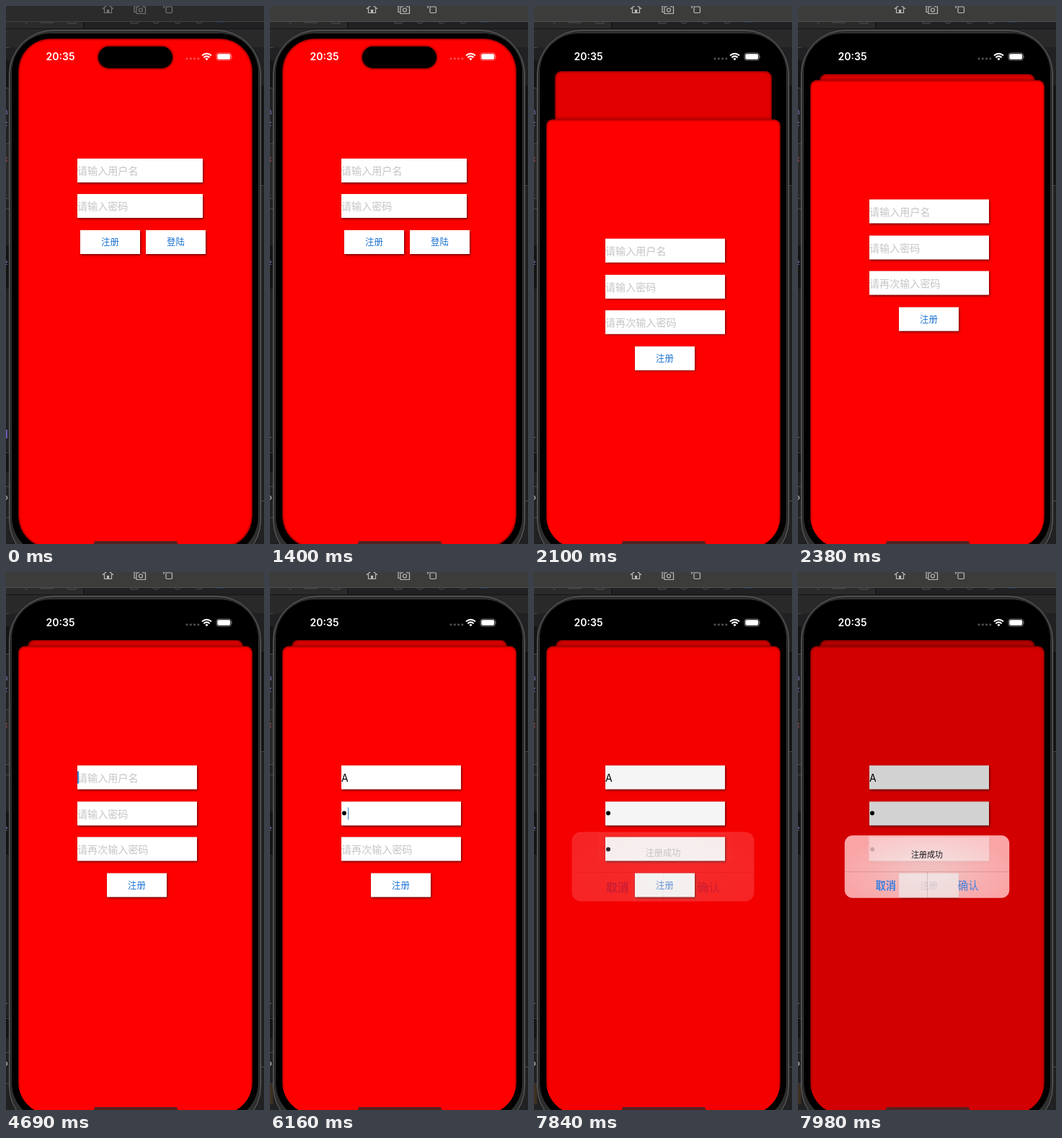
Write an HTML page that moves like this. It is 358 px wide and 744 px high and loops after 8 s.

```html
<!DOCTYPE html>
<html lang="zh-CN">
<head>
<meta charset="utf-8">
<title>注册</title>
<style>
  html, body { margin: 0; width: 100%; height: 100%; overflow: hidden; background: #212123; }
  body { font-family: "Noto Sans CJK SC", "Noto Sans CJK", "Noto Sans", sans-serif; }
  div, svg { position: absolute; box-sizing: border-box; }
  #stage { left: 0; top: 0; width: 358px; height: 744px; overflow: hidden; background: #212123; }
  #desk, #icons { left: 0; top: 0; width: 358px; height: 744px; }

  #toolbar { left: 0; top: 0; width: 358px; height: 22px; background: #2b2b2b; border-bottom: 1px solid #414141; color: #777; }
  .focused #toolbar { background: #3c3c3b; border-color: #505050; color: #bcbcbc; }
  #edge { left: 0; top: 0; width: 4px; height: 744px; overflow: hidden; font: 11px/14px "Noto Sans Mono", monospace; color: #8a78c8; }
  #edge div { left: -4px; }
  .focused #idle { display: none; }

  #phone { left: 4px; top: 33px; width: 350px; height: 740px; border-radius: 62px; background: #2e2e2f; border: 1px solid #666; }
  #bezel { left: 8px; top: 38px; width: 342px; height: 722px; border-radius: 54px; background: #000; }
  #screen { left: 17px; top: 45px; width: 325px; height: 705px; border-radius: 45px; overflow: hidden; background: #000; }
  .page { left: 0; top: 0; width: 325px; height: 705px; background: #f00; box-shadow: inset 0 0 3px 1px rgba(0,0,0,.6); }
  #login { transform-origin: 50% 0; overflow: hidden; }
  #sheet { border-radius: 9px 9px 0 0; box-shadow: 0 -1px 5px rgba(0,0,0,.3), inset 0 0 3px 1px rgba(0,0,0,.5); }
  .cover { left: 0; top: 0; width: 325px; height: 705px; background: #000; opacity: 0; }
  #home { left: 105px; top: 695px; width: 116px; height: 4.5px; border-radius: 3px; background: #542222; }

  .field, .button { height: 33px; line-height: 33px; background: #fff; box-shadow: 1px 1.5px 3px rgba(0,0,0,.6); white-space: nowrap; }
  .field { left: 82px; font-size: 14.1px; }
  .button { width: 83px; font-size: 12.4px; text-align: center; color: #1b72d2; }
  .hint { left: 0; color: #c6c6c6; font-weight: 300; }
  .letter { left: 0; color: #000; font-family: Inter, sans-serif; font-size: 14px; }
  .bullet { left: 1px; top: 13.5px; width: 6.2px; height: 6.2px; border-radius: 50%; background: #000; }
  .caret { top: 8px; width: 1.5px; height: 17px; background: #3a7fc9; }

  #island { left: 128px; top: 55.5px; width: 102.5px; height: 30px; border-radius: 15px; background: #000; box-shadow: 0 0 3px 1px rgba(0,0,0,.6); }
  #clock { left: 45px; top: 60px; width: 61px; text-align: center; font: 600 14px/20px Inter, sans-serif; color: #fff; }

  #alert { left: 67px; top: 365px; width: 224px; height: 85px; border-radius: 11px; overflow: hidden; opacity: 0; text-align: center;
    background: radial-gradient(ellipse at 50% 60%, rgba(248,219,219,.9) 15%, rgba(255,186,188,.92) 75%); }
  #alert div { white-space: nowrap; }
  #title { left: 0; top: 14.5px; width: 224px; font-size: 10.8px; line-height: 20px; color: #111; }
  .choice { top: 49px; width: 112px; height: 36px; line-height: 36px; font-size: 14px; color: #3a88ea; }
  .rule { background: rgba(120,60,60,.22); }
</style>
</head>
<body>
<div id="stage">
  <svg id="desk" viewBox="0 0 358 744">
    <path fill="#2a2a2b" d="M0 22h108v10H0z"/>
    <path fill="#29292a" d="M0 32h358v25H0zM0 190h4v76H0z"/>
    <path fill="#151516" d="M107 21h1.5v11h-1.5zM0 31h358v1H0zM0 75h4v38H0zM0 331h4v60H0zM354 110h4v140h-4zM0 615h4v30H0z"/>
    <path stroke="#4a4a4b" d="M0 57.5h4M0 113.500h4M0 190.500h4M0 266.500h4M0 280.500h4M0 617.500h4M0 664.500h4M0 707.500h4M354 248.500h4M354 684.500h4"/>
    <g fill="none" stroke="#505052">
      <path d="M30 19l-4 3 4 3M48 23h18M86 19h11v5H86zM173 19h10v5h-10z"/>
      <path d="M203 20a5 4 0 0 0 10 0M233 20a5 4 0 0 0 10 0M263 20a5 4 0 0 0 10 0"/>
      <path stroke="#26418c" d="M292 22h12"/>
    </g>
  </svg>
  <div id="edge">
    <div style="top:139px">n</div>
    <div style="top:155px">z</div>
    <div style="top:204px;color:#d0524c">x</div>
    <div style="top:347px">e</div>
    <div style="top:586px;color:#8d8d98">i</div>
    <div style="top:672px;color:#ddd">o</div>
    <div id="idle" style="left:0;top:586px;width:2px;height:12px;background:#6b5bb0"></div>
    <div id="patch" style="left:0;top:709px;width:4px;height:27px;background:#3d3020"></div>
  </div>
  <div id="toolbar">
    <svg width="358" height="21" fill="none" stroke="currentColor" stroke-width="1.2">
      <path d="M134 4l7.500-6 7.500 6M136.500 3v6.500h10V3"/><path fill="currentColor" d="M140.500 5.500h2v3.500h-2z"/>
      <path d="M180 0h-2v8.500h2M181 1h3l1-2h4l1 2h3.500v9.500H181z"/><circle cx="187" cy="5.500" r="2.500"/>
      <rect x="222" y="1" width="8.500" height="8.500" rx="1.500"/><path d="M219 3V0h3"/>
    </svg>
  </div>

  <div id="phone"></div>
  <div id="bezel"></div>
  <div id="screen">
    <div id="login" class="page">
      <div class="field" style="top:165.500px;width:174px"><div class="hint">请输入用户名</div></div>
      <div class="field" style="top:215px;width:174px"><div class="hint">请输入密码</div></div>
      <div class="button" style="left:86px;top:264.500px"><span id="openText">注册</span></div>
      <div class="button" style="left:177px;top:264.500px">登陆</div>
      <div id="loginDim" class="cover"></div>
    </div>
    <div id="sheet" class="page">
      <div class="field" style="top:165px;width:165.500px"><div class="hint">请输入用户名</div><div class="letter">A</div><div class="caret"></div></div>
      <div class="field" style="top:214.500px;width:165.500px"><div class="hint">请输入密码</div><div class="bullet"></div><div class="caret"></div></div>
      <div class="field" style="top:264px;width:165.500px"><div class="hint">请再次输入密码</div><div class="bullet"></div><div class="caret"></div></div>
      <div class="button" style="left:123px;top:313.500px"><span id="sendText">注册</span></div>
    </div>
    <div id="alertDim" class="cover"></div>
    <div id="home"></div>
  </div>

  <div id="island"></div>
  <div id="clock">20:35</div>
  <svg id="icons" viewBox="0 0 358 744">
    <g fill="#fff" fill-opacity=".3">
      <circle cx="251" cy="72.800" r="1.600"/><circle cx="256.300" cy="72.800" r="1.600"/><circle cx="261.600" cy="72.800" r="1.600"/><circle cx="266.900" cy="72.800" r="1.600"/>
    </g>
    <g fill="none" stroke="#fff" stroke-width="2">
      <path d="M272 68.500q6.500-5.600 13 0M274.300 71.200q4.200-3.600 8.400 0"/>
    </g>
    <path fill="#fff" d="M276.300 73q2.200-1.800 4.400 0l-2.200 2.300z"/>
    <rect x="292" y="65" width="20.500" height="10" rx="3.200" fill="none" stroke="#fff" stroke-opacity=".45"/>
    <rect x="293.300" y="66.300" width="17.900" height="7.400" rx="2" fill="#fff"/>
    <path fill="#fff" fill-opacity=".5" d="M313.500 68.300q1.700 1.700 0 3.400z"/>
  </svg>

  <div id="alert">
    <div style="left:32px;top:0;width:165px;height:35px;background:rgba(255,255,255,.16)"></div>
    <div style="left:35px;top:16px;width:6px;height:6px;border-radius:50%;background:rgba(90,70,70,.15)"></div>
    <div style="left:74px;top:52px;width:81px;height:32px;background:rgba(240,232,232,.5);font-size:12px;line-height:32px;color:rgba(110,110,110,.12)">注册</div>
    <div id="title">注册成功</div>
    <div class="rule" style="left:0;top:49px;width:224px;height:1px"></div>
    <div class="rule" style="left:112px;top:49px;width:1px;height:36px"></div>
    <div class="choice" style="left:0;font-weight:700">取消</div>
    <div class="choice" style="left:112px">确认</div>
  </div>
</div>

<script>
  const LOOP = 8000, STEP = 70;
  const $ = id => document.getElementById(id);
  const show = (el, on) => { el.style.visibility = on ? 'visible' : 'hidden'; };
  const clamp = v => Math.min(1, Math.max(0, v));

  // Critically damped spring from 0 to 1; rate is per second.
  function spring(t, start, rate) {
    const x = Math.max(0, t - start) / 1000 * rate;
    return 1 - (1 + x) * Math.exp(-x);
  }

  // Text dims on touch and fades back after release.
  function pressed(t, down, up, fade) {
    if (t < down) return 1;
    return 0.3 + 0.7 * clamp((t - up) / fade);
  }

  const inputs = [
    { focus: 4690, typed: 5390, blur: 5880, caretEnd: 10 },
    { focus: 5880, typed: 6160, blur: 6720, caretEnd: 8.5 },
    { focus: 6790, typed: 7070, blur: 7840, caretEnd: 8.5 }
  ];
  const fields = [...document.querySelectorAll('#sheet .field')];

  function drawInput(field, input, t) {
    const [hint, value, caret] = field.children;
    const filled = t >= input.typed;
    show(hint, !filled);
    show(value, filled);
    show(caret, t >= input.focus && t < input.blur);
    caret.style.left = (filled ? input.caretEnd : 0) + 'px';
  }

  function drawSheet(t) {
    const p = t >= 2380 ? 1 : spring(t, 1801, 13.75);
    const login = $('login').style;
    login.transform = `translateY(${49 * p}px) scale(${1 - 0.08 * p})`;
    login.borderRadius = 10 + 35 * (1 - p) ** 2 + 'px';
    $('loginDim').style.opacity = 0.12 * p;
    $('sheet').style.transform = `translateY(${705 - 647.5 * p}px)`;
    show($('sheet'), p > 0);
  }

  function drawAlert(t) {
    const p = spring(t, 7800, 20);
    $('alertDim').style.opacity = 0.2 * p;
    $('alert').style.opacity = clamp(p * 1.1);
    $('alert').style.transform = `scale(${1 + 0.16 * (1 - p)})`;
  }

  function render(now) {
    const t = Math.floor((now % LOOP) / STEP) * STEP;
    $('stage').classList.toggle('focused', t >= 1400);
    show($('patch'), t >= 5040);
    $('openText').style.opacity = pressed(t, 1610, 1750, 210);
    $('sendText').style.opacity = pressed(t, 7490, 7630, 280);
    drawSheet(t);
    fields.forEach((field, i) => drawInput(field, inputs[i], t));
    drawAlert(t);
  }

  const begin = performance.now();
  function tick() {
    render(performance.now() - begin);
    requestAnimationFrame(tick);
  }
  tick();
</script>
</body>
</html>
```
